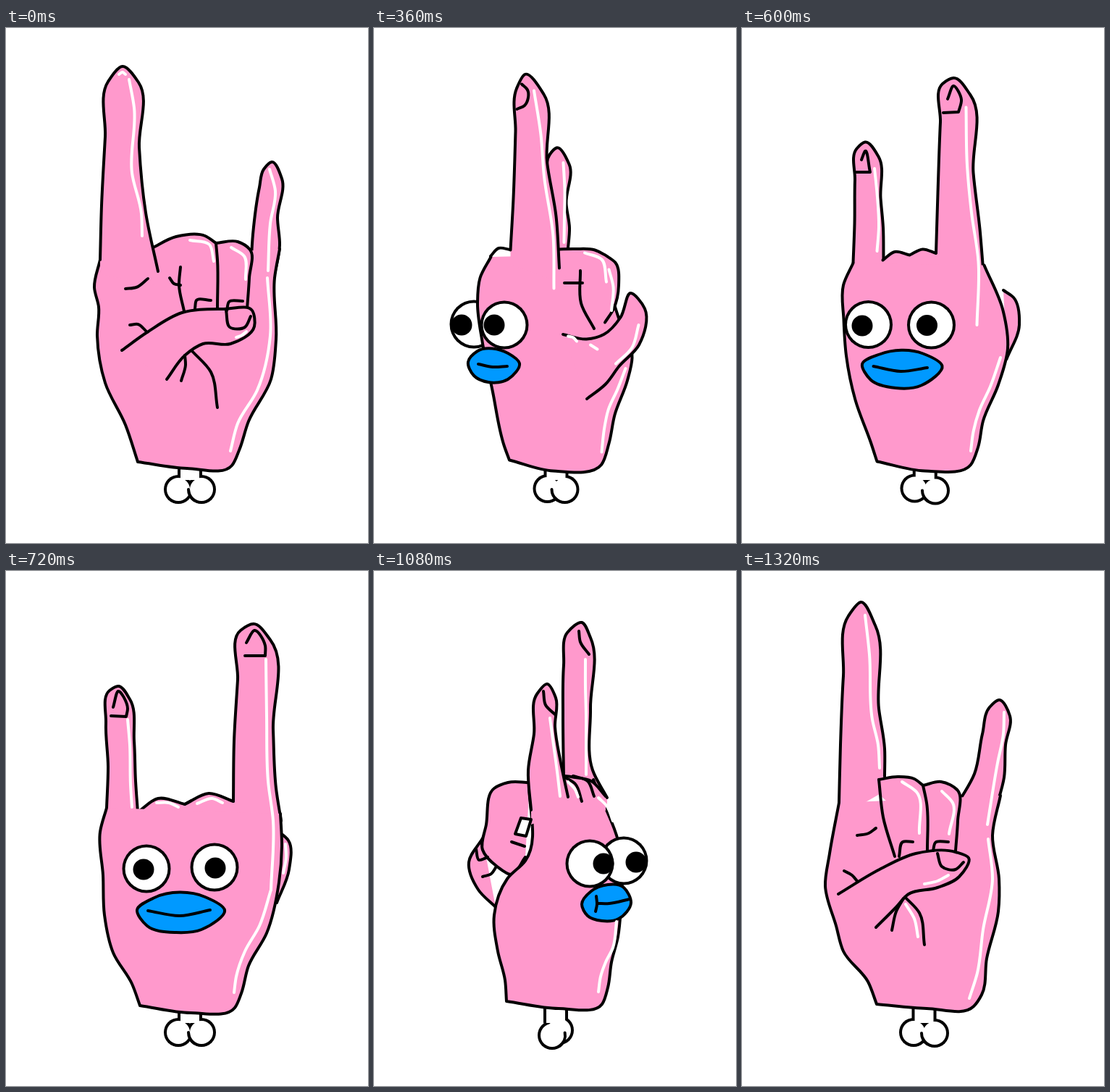
Animation of 500x711 px, one loop 1440 ms. Source, as an HTML page with a canvas:

```html
<!DOCTYPE html>
<html lang="en">
<head>
<meta charset="utf-8">
<title>Turning hand</title>
<style>
html, body { margin: 0; width: 100%; height: 100%; overflow: hidden; background: #fff; }
canvas { display: block; width: 100vw; height: 100vh; }
</style>
</head>
<body>
<canvas id="stage" width="500" height="711"></canvas>
<script>
const PINK = '#ff99cc', BLUE = '#0099ff', INK = '#000', STEP = 120, STEPS = 12;
const ctx = document.getElementById('stage').getContext('2d');
ctx.lineCap = ctx.lineJoin = 'round';

const poses = Array.from({ length: STEPS }, () => new Map());
const put = (step, name, text) => poses[step].set(name, text);

// Fills a pose with the halfway shapes of its neighbours, layered like one of them.
function between(step, order) {
  const other = poses[2 * step - order], skeleton = s => s.replace(/\d+/g, '#');
  for (const [name, a] of poses[order]) {
    const b = other.get(name);
    if (!b || skeleton(a) !== skeleton(b)) continue;
    const nums = b.match(/\d+/g);
    put(step, name, a.replace(/\d+/g, n => (+n + +nums.shift()) / 2));
  }
}

const points = text => text.trim().split(/\s+/).map(p => p.split(',').map(Number));
const gap = (a, b) => Math.hypot(b[0] - a[0], b[1] - a[1]) || 1;

// Tangent at b, weighted so that the nearer neighbour counts more.
function slope(a, b, c) {
  const p = a ? gap(a, b) : 1, q = c ? gap(b, c) : 1;
  if (!a || !c) return [0, 1].map(i => a ? (b[i] - a[i]) / p : (c[i] - b[i]) / q);
  return [0, 1].map(i => ((b[i] - a[i]) / p * q + (c[i] - b[i]) / q * p) / (p + q));
}

function curve(path, pts) {
  const n = pts.length - 1, loop = n > 2 && pts[0].join() === pts[n].join();
  const dirs = pts.map((p, i) =>
    slope(i ? pts[i - 1] : loop && pts[n - 1], p, i < n ? pts[i + 1] : loop && pts[1]));
  for (let i = 0; i < n; i++) {
    const a = pts[i], b = pts[i + 1], d = gap(a, b) / 3, u = dirs[i], v = dirs[i + 1];
    path.bezierCurveTo(a[0] + u[0] * d, a[1] + u[1] * d, b[0] - v[0] * d, b[1] - v[1] * d, ...b);
  }
}

// "x,y x,y" is a smooth curve, "|" makes a corner, ";" starts a new stroke.
function trace(text) {
  const path = new Path2D();
  for (const stroke of text.split(';')) {
    let last;
    for (const part of stroke.split('|')) {
      const pts = points(part);
      if (last) pts.unshift(last); else path.moveTo(...pts[0]);
      curve(path, pts);
      last = pts[pts.length - 1];
    }
  }
  return path;
}

function disc([x, y], r, fill) {
  ctx.beginPath();
  ctx.arc(x, y, r, 0, Math.PI * 2);
  ctx.fillStyle = fill;
  ctx.fill();
}

function eye([ball, pupil]) {
  disc(ball, 33.5, INK);
  disc(ball, 29.5, '#fff');
  disc(pupil, 14.5, INK);
}

function bone([a, b]) {
  const mid = (a[0] + b[0]) / 2, side = Math.sign(b[0] - a[0]);
  for (const [color, grow] of [[INK, 2], ['#fff', -2]]) {
    disc(a, 18 + grow, color);
    disc(b, 18 + grow, color);
    ctx.fillRect(mid - 15 - grow, 602, 30 + 2 * grow, 22);
  }
  ctx.strokeStyle = INK;
  ctx.beginPath();
  if (side > 0) ctx.arc(...b, 18, Math.PI, Math.PI * 0.7, true);
  else ctx.arc(...b, 18, -0.2, Math.PI * 0.3);
  ctx.stroke();
}

const fills = { palm: PINK, index: PINK, pinky: PINK, fist: PINK, thumb: PINK,
  tip: PINK, curl: PINK, knuckles: PINK, lips: BLUE, lipsBack: BLUE, hole: '#fff' };
const rooted = new Set(['index', 'pinky', 'fist', 'knuckles']);

function draw(name, text) {
  if (name === 'bone') return bone(points(text));
  if (name.startsWith('eye')) return eye(points(text));
  const path = trace(text);
  if (fills[name]) {
    const area = new Path2D(path);
    if (rooted.has(name)) {
      const pts = points(text.replace(/\|/g, ' ')), [x0, y0] = pts[0], [x1, y1] = pts[pts.length - 1];
      area.lineTo(x1, y1 + 20);
      area.lineTo(x0, y0 + 20);
    }
    ctx.fillStyle = fills[name];
    ctx.fill(area);
  }
  ctx.strokeStyle = name.startsWith('shine') ? '#fff' : INK;
  ctx.stroke(path);
}

// palm view
put(0, 'bone', '238,637 270,637');
put(0, 'pinky', '338,335 341,285 350,220 356,195 367,185 381,208 375,262 378,300 370,345');
put(0, 'palm', '130,320 122,358 128,385 126,425 137,490 165,548 182,599|250,608 312,604 322,583 335,543 366,485 373,430 371,345 378,305');
put(0, 'fist', '201,304 235,288 275,287 290,297|320,295 337,306 336,345 333,388');
put(0, 'index', '130,320 132,245 137,150 141,74 161,53 183,75 184,165 193,255 210,336');
put(0, 'fold', '290,297 292,320 292,386');
put(0, 'thumb', '160,445 195,420 243,393 300,388 340,390 343,412 310,436 272,436 247,452 222,485');
put(0, 'crease', '165,360 180,358 196,346');
put(0, 'inner', '241,330 239,355 246,391;226,345 232,353 241,355');
put(0, 'tips', '261,387 263,376 283,376;305,390 308,378 327,377');
put(0, 'thumbNail', '304,390 309,413 330,413 338,398');
put(0, 'wrinkles', '247,452 248,465 242,487;257,446 283,475 292,524;171,410 182,409 195,420');
put(0, 'shineIndex', '170,71 177,110 174,200 187,256 188,287');
put(0, 'shineNail', '156,64 161,61 165,64');
put(0, 'shinePinky', '364,195 372,225 365,270 362,335');
put(0, 'shineSide', '361,345 365,425 347,500 320,546 310,584');
put(0, 'shineFist', '254,293 281,299 287,322;311,303 329,315 331,347');
put(0, 'shineThumb', '318,427 326,424 332,419');

// thumb side, face still hidden
put(2, 'bone', '240,638 263,634');
put(2, 'eyeL', '152,409 140,410');
put(2, 'lipsBack', '165,441 148,441 138,457 145,472 165,475');
put(2, 'pinky', '289,297 296,265 305,212 311,182 319,175 333,198 325,250 329,290 326,312');
put(2, 'palm', '155,310 143,340 139,375 147,435 162,500 178,580 186,596|245,610 312,603 322,572 334,528 352,488 356,456 334,395 329,305');
put(2, 'fist', '221,298 245,296 275,295 291,297|318,298 329,320 332,360 333,398');
put(2, 'index', '155,310 159,250 163,175 164,95 175,63 203,93 208,190 219,265 226,345');
put(2, 'fold', '291,297 306,330 312,415');
put(2, 'thumb', '225,432 277,441 310,420 341,399 357,366 374,385 364,440 320,478 290,508 248,524');
put(2, 'crease', '197,382 207,378 215,372');
put(2, 'inner', '262,333 268,380 305,424;234,347 245,351 262,351');
put(2, 'tips', '307,384 291,398 302,416;329,381 317,393 321,405');
put(2, 'thumbNail', '353,375 352,385 360,393 371,402');
put(2, 'wrinkles', '294,511 288,526 275,540;226,345 232,372 223,391');
put(2, 'nailIndex', '169,77 178,76 176,102 166,108');
put(2, 'nailPinky', '322,193 318,207 305,213');
put(2, 'shineIndex', '182,76 199,115 198,190 211,275 214,339');
put(2, 'shinePinky', '325,189 325,235 320,265 326,302');
put(2, 'shineSide', '347,470 337,497 321,525 315,552 312,585');
put(2, 'shineFist', '270,301 297,315 302,356;309,305 320,325 325,373');
put(2, 'shineThumb', '365,410 350,452 310,482');
put(2, 'shineBase', '241,437 253,438 261,446;285,445 293,443');

// face coming round from the left
put(4, 'bone', '239,634 264,640');
put(4, 'tip', '348,366 360,372 375,408 357,456');
put(4, 'pinky', '168,322 170,270 174,210 174,168 185,156 206,178 206,235 211,262 209,305');
put(4, 'index', '222,303 226,220 228,110 230,72 242,65 266,90 270,180 284,255 286,318');
put(4, 'knuckles', '207,308 212,304 216,305|219,304 222,304');
put(4, 'palm', '168,322 150,350 147,385 152,430 165,500 182,575 188,597|250,613 316,603 327,575 331,540 348,485 357,455 340,400 290,320');
put(4, 'thumb', '297,414 310,418 325,426 340,400 352,366 374,390 368,435 357,456 350,475 340,500');
put(4, 'fist', '285,313 310,314 335,318 348,330|349,350 347,390 330,415 305,415');
put(4, 'hole', '290,404 302,392 295,409');
put(4, 'folds', '177,324 192,306 216,305;192,333 198,315 216,305;207,343 212,322 222,303;286,318 295,360 289,402 309,437;294,355 313,356;308,357 306,372 309,387;325,426 333,437 340,457');
put(4, 'nailIndex', '239,78 246,95 240,112 229,116');
put(4, 'nailPinky', '189,171 189,188 187,197|173,197');
put(4, 'eyeL', '155,408 142,410');
put(4, 'eyeR', '235,411 222,411');
put(4, 'lips', '151,460 175,450 225,449 251,465 225,492 190,495 160,481 151,460');
put(4, 'mouth', '167,465 198,472 230,470');
put(4, 'corner', '230,459 232,470 230,481');
put(4, 'shineIndex', '260,97 262,180 272,220 284,300 283,380');
put(4, 'shinePinky', '198,183 202,215 206,255 199,290');
put(4, 'shineSide', '348,470 336,500 326,530 321,555 317,586');
put(4, 'shineFist', '312,320 332,324 340,345;340,362 341,390 331,407');
put(4, 'shineThumb', '366,410 363,430 358,445');
put(4, 'shineBase', '295,414 298,417 299,419;313,430 324,444');

// face to the front
put(6, 'bone', '238,637 270,637');
put(6, 'tip', '374,358 390,372 391,412 374,458');
put(6, 'pinky', '139,327 141,270 138,210 143,165 155,159 171,177 177,235 179,290 182,333');
put(6, 'index', '314,318 315,235 320,150 324,82 342,73 365,95 369,220 373,300 380,345');
put(6, 'knuckles', '182,333 210,314 247,322|280,307 314,318');
put(6, 'palm', '139,327 130,360 134,420 136,475 148,527 174,570 185,600|255,610 316,603 325,583 335,545 360,500 377,430 381,380 379,335');
put(6, 'folds', '247,322 256,317');
put(6, 'nailIndex', '332,99 343,82 358,103 358,117|330,117');
put(6, 'nailPinky', '148,188 155,166 168,190 166,201|145,200');
put(6, 'eyeL', '194,411 190,412');
put(6, 'eyeR', '288,409 289,410');
put(6, 'lips', '181,468 205,451 275,450 302,468 270,495 235,499 195,490 181,468');
put(6, 'mouth', '196,469 240,476 282,468');
put(6, 'shineIndex', '359,122 360,200 362,290 369,345 366,440');
put(6, 'shinePinky', '168,205 171,240 172,295 174,326');
put(6, 'shineSide', '366,440 350,490 330,525 318,560 315,582');
put(6, 'shineKnuckles', '208,320 225,320 238,326;264,321 285,314 299,320');
put(6, 'shineTip', '386,377 387,395 383,417');

// face leaving to the right
put(7, 'bone', '237,638 266,636');
put(7, 'tip', '147,384 124,405 140,437 155,441');
put(7, 'curl', '160,315 157,316 152,322 147,360 145,390 148,412 156,420 158,400');
put(7, 'index', '295,312 295,235 298,150 303,85 319,70 337,95 342,200 348,300 351,340');
put(7, 'pinky', '160,372 160,320 164,215 172,170 187,155 199,178 201,220 207,270 206,330');
put(7, 'knuckles', '206,306 235,304 253,309|275,305 296,313');
put(7, 'palm', '160,330 157,400 154,455 163,512 178,550 180,585 188,596|260,602 320,596 326,575 335,535 352,495 358,460 355,400 349,325');
put(7, 'folds', '235,305 252,315 255,332;280,306 296,313 305,330;159,388 165,404');
put(7, 'nailIndex', '306,103 318,82 333,103 333,118|308,119');
put(7, 'nailPinky', '181,172 183,192 198,203');
put(7, 'eyeR', '316,408 319,410');
put(7, 'eyeL', '225,412 231,413');
put(7, 'lips', '213,468 235,449 315,447 334,462 300,490 260,496 222,486 213,468');
put(7, 'mouth', '229,470 280,473 316,462');
put(7, 'corner', '231,465 230,471 229,477');
put(7, 'shineIndex', '331,123 333,200 339,290 346,365 350,440');
put(7, 'shinePinky', '193,207 197,240 200,290 199,327');
put(7, 'shineSide', '350,440 343,482 330,520 320,555 314,584');
put(7, 'shineKnuckles', '223,309 238,312 246,325;262,314 284,314 297,328');

// little finger side
put(9, 'bone', '256,634 246,641');
put(9, 'tip', '150,369 131,402 144,440 168,464');
put(9, 'curl', '215,292 185,292 166,300 155,350 150,385 170,408 190,419 209,395');
put(9, 'index', '262,285 261,200 262,130 267,85 287,71 299,92 299,190 302,275 322,313');
put(9, 'palm', '214,288 209,400 184,425 166,475 171,525 181,565 183,594|255,604 315,598 323,575 328,540 337,505 341,465 341,390 303,288');
put(9, 'knuckles', '255,285 262,283 272,284|300,290 320,311');
put(9, 'pinky', '217,330 213,275 221,225 225,170 239,156 251,175 250,215 258,265 268,312');
put(9, 'hole', '203,341|217,343|210,366|195,363|203,341');
put(9, 'folds', '264,285 278,294 287,318;275,283 295,290 304,311;190,374 208,380;141,384 145,399 157,395;150,422 162,418 169,408');
put(9, 'nailIndex', '283,83 285,98 297,115');
put(9, 'nailPinky', '234,166 237,185 250,198');
put(9, 'eyeR', '345,400 362,402');
put(9, 'eyeL', '298,404 317,404');
put(9, 'lips', '287,460 300,442 345,437 355,458 338,480 315,483 295,476 287,460');
put(9, 'mouth', '308,459 325,459 353,453');
put(9, 'corner', '307,449 308,460 306,470');
put(9, 'shineIndex', '292,122 292,160 293,200 293,240 293,281');
put(9, 'shinePinky', '243,203 248,240 254,285 257,311');
put(9, 'shineSide', '335,484 330,520 320,540 313,560 310,581');
put(9, 'shineKnuckles', '268,291 278,302 282,312;310,313 322,325 330,345');

// palm again
put(11, 'bone', '237,637 266,638');
put(11, 'eyeR', '315,430 315,430');
put(11, 'index', '134,320 136,240 140,145 147,62 164,43 184,75 189,190 197,245 197,284');
put(11, 'pinky', '300,318 321,280 332,225 342,188 355,178 370,200 364,240 362,285 350,330');
put(11, 'palm', '134,320 121,390 115,435 130,490 140,525 174,567 186,598|255,604 320,601 331,585 338,535 354,470 355,425 346,365 357,310');
put(11, 'fist', '189,288 215,284 238,287 250,296|275,291 298,303 298,345 295,386');
put(11, 'fold', '250,296 255,320 256,388');
put(11, 'inner', '189,288 195,340 211,394');
put(11, 'thumb', '133,446 190,412 240,390 295,388 313,396 300,422 270,437 230,446 212,465 185,492');
put(11, 'crease', '159,365 175,362 185,355');
put(11, 'tips', '217,394 222,374 236,374;264,386 267,375 285,374');
put(11, 'thumbNail', '270,390 276,408 295,412 306,402');
put(11, 'wrinkles', '223,452 213,470 207,496;225,450 245,472 252,516;141,414 152,420 159,428');
put(11, 'shineIndex', '170,61 176,115 180,205 188,240 190,272');
put(11, 'shinePinky', '362,195 361,225 353,265 339,350');
put(11, 'shineSide', '340,370 346,425 333,495 325,555 314,590');
put(11, 'shineFist', '221,291 241,305 245,362;276,304 291,320 286,363');
put(11, 'shineThumb', '252,432 270,428 285,420');
put(11, 'shinePalm', '226,460 238,480 243,505');

between(1, 0);
between(3, 2);
between(5, 6);
between(8, 7);
between(10, 11);

put(3, 'eyeL', '138,409 121,410');
put(3, 'folds', '161,315 172,304 188,306;263,352 288,352;285,335 286,380 304,415');
put(3, 'eyeR', '180,410 166,410');
put(3, 'lips', '130,461 143,446 185,449 201,463 185,485 158,489 138,480 130,461');
put(3, 'mouth', '144,464 164,468 184,467');
put(5, 'nailIndex', '284,98 292,80 303,99 299,116|278,117');
put(5, 'nailPinky', '165,182 170,170 177,199|158,199');
put(8, 'nailIndex', '296,98 306,83 316,116');
put(8, 'folds', '248,297 264,305 270,325;272,296 292,302 301,322');
put(10, 'fist', '170,320 172,298 195,290 232,293|250,300 258,320 255,355 248,386');
put(10, 'fold', '215,291 226,325 218,390');
put(10, 'thumb', '146,478 122,450 114,415 130,392 170,392 225,388 241,400 225,428 195,442 180,470');
put(10, 'thumbNail', '208,390 214,406 236,408');
put(10, 'folds', '312,306 330,299');

let shown = -1;
function tick() {
  const step = Math.floor(performance.now() / STEP) % STEPS;
  if (step !== shown) {
    shown = step;
    ctx.fillStyle = '#fff';
    ctx.fillRect(0, 0, 500, 711);
    ctx.lineWidth = 4;
    poses[step].forEach((text, name) => draw(name, text));
  }
  requestAnimationFrame(tick);
}
tick();
</script>
</body>
</html>
```
